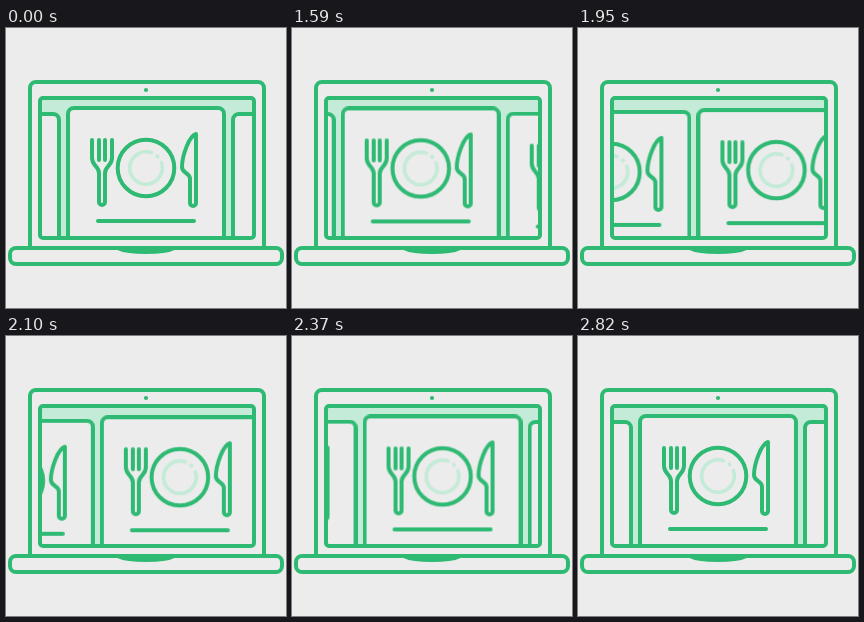
An HTML page for the animation above (2.85 s loop, 280 by 280 pixels).

```html
<!DOCTYPE html>
<html lang="en">
<head>
<meta charset="utf-8">
<title>Laptop menu carousel</title>
<style>
  html, body { margin: 0; width: 100%; height: 100%; overflow: hidden; background: #ececec; }
  svg { display: block; width: 100vw; height: 100vh; }
  .line { fill: none; stroke: #2fba74; stroke-width: 4; stroke-linecap: round; stroke-linejoin: round; }
  .sheet { fill: #ececec; }
  .mint { fill: #c4ebd7; }
  .shine { stroke: #c4ebd7; stroke-width: 3.6; }
  .dot { fill: #2fba74; }
</style>
</head>
<body>
<svg viewBox="0 0 280 280">
  <defs>
    <clipPath id="screen"><rect x="34" y="70" width="214" height="140" rx="3"/></clipPath>
    <g id="card" class="line">
      <path class="sheet" d="M62 230V86a6 6 0 0 1 6-6H212a6 6 0 0 1 6 6V230"/>
      <path d="M86 112V130C86 138 93 138 93 145V174a3 3 0 0 0 6 0V145C99 138 106 138 106 130V112M93 112V132M99 112V132"/>
      <circle cx="140" cy="140" r="28.3"/>
      <path id="ring" class="shine"/>
      <path d="M190 106C183 108 176 128 176 139C176 146 184 144 184 151V175a3 3 0 0 0 6 0Z"/>
      <path d="M92 193H188"/>
    </g>
  </defs>

  <path class="line" d="M24 220V60a6 6 0 0 1 6-6H252a6 6 0 0 1 6 6V220"/>
  <circle class="dot" cx="140" cy="62" r="2.1"/>

  <g clip-path="url(#screen)">
    <rect class="mint" x="34" y="70" width="214" height="140"/>
    <g id="cards"></g>
  </g>
  <rect class="line" x="34" y="70" width="214" height="140" rx="3"/>

  <rect class="line" x="4" y="220" width="272" height="16" rx="6"/>
  <path class="line" d="M113 220.5C118 223 128 224 140 224S162 223 167 220.5"/>
</svg>
<script>
const LOOP = 2850, STEP = 30, START = 1410, SLIDE = 1410;
const PITCH = 165, DROP = 6;

// Cubic bezier (x1, 0, x2, 1), solved by bisection.
function ease(x, x1 = 1 / 3, x2 = 1 / 6) {
  if (x <= 0) return 0;
  if (x >= 1) return 1;
  let lo = 0, hi = 1;
  for (let i = 0; i < 30; i++) {
    const u = (lo + hi) / 2, v = 1 - u;
    if (3 * u * v * v * x1 + 3 * u * u * v * x2 + u ** 3 < x) lo = u;
    else hi = u;
  }
  return lo * lo * (3 - 2 * lo);
}

function arc(from, to, r = 16.3) {
  const at = a => {
    const rad = a * Math.PI / 180;
    return `${140 + r * Math.cos(rad)} ${140 + r * Math.sin(rad)}`;
  };
  return `M${at(from)}A${r} ${r} 0 ${to - from > 180 ? 1 : 0} 1 ${at(to)}`;
}
document.getElementById('ring').setAttribute('d', arc(-20, 290) + arc(-47, -44));

// Cards away from the centre sit slightly lower.
function place(slot, time) {
  const k = slot - ease((time - START) / SLIDE);
  return `translate(${k * PITCH}px, ${DROP * Math.min(1, Math.abs(k))}px)`;
}

function addCard(slot) {
  const use = document.createElementNS('http://www.w3.org/2000/svg', 'use');
  use.setAttribute('href', '#card');
  document.getElementById('cards').append(use);
  const frames = [{ offset: 0, transform: place(slot, 0), easing: 'steps(1)' }];
  for (let t = START; t <= LOOP; t += STEP) {
    frames.push({ offset: t / LOOP, transform: place(slot, t), easing: 'steps(1)' });
  }
  use.animate(frames, { duration: LOOP, iterations: Infinity });
}
[-1, 0, 1, 2].forEach(addCard);
</script>
</body>
</html>
```
